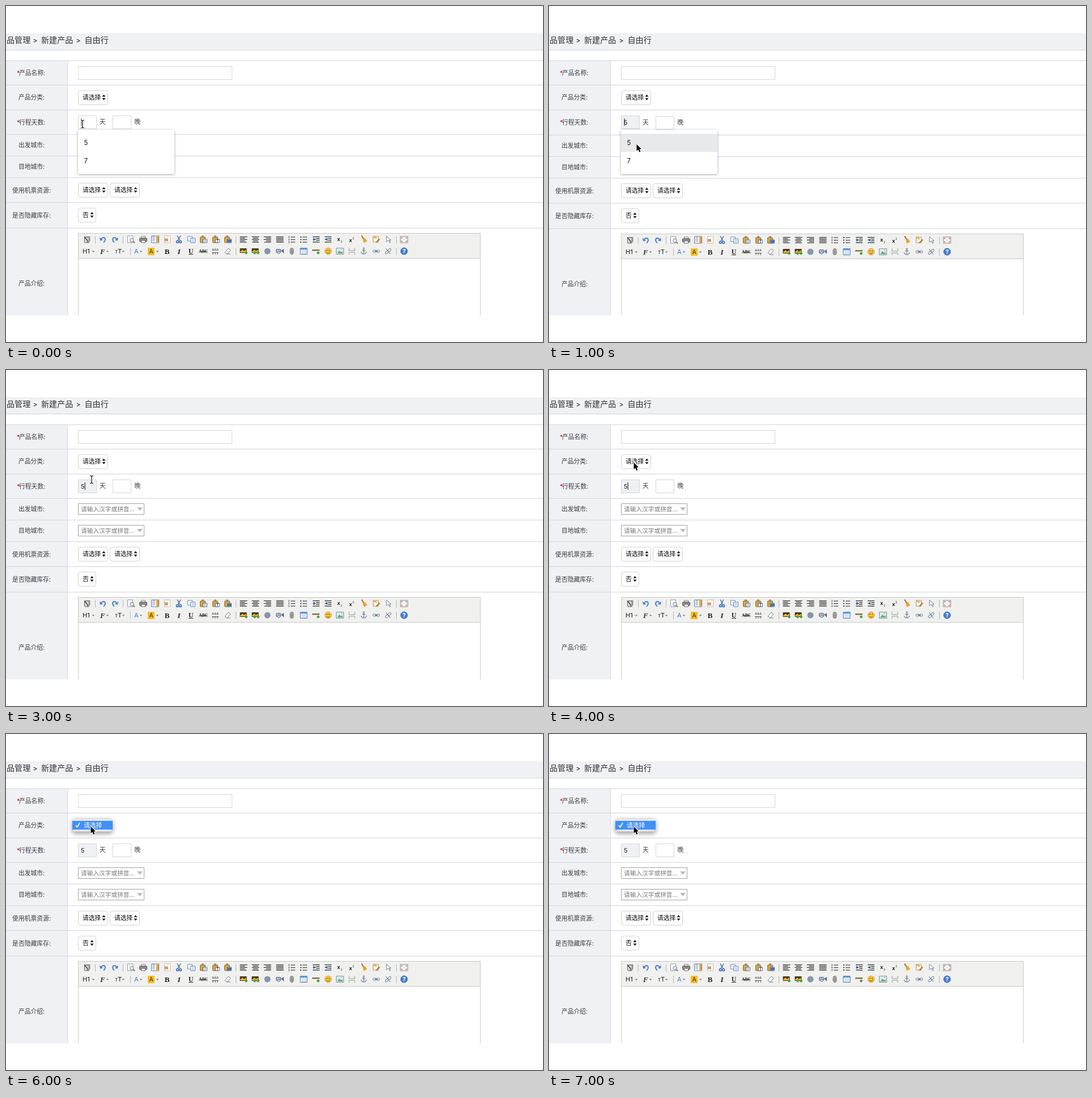
Recreate the animation shown at these times as an HTML page with a canvas. Size 947 px wide and 592 px high, loop 8 s.

```html
<!DOCTYPE html>
<html lang="zh-CN">
<head>
<meta charset="utf-8">
<style>
html, body { margin: 0; width: 100%; height: 100%; overflow: hidden; background: #fff; }
canvas { display: block; }
</style>
</head>
<body>
<canvas id="stage" width="947" height="592"></canvas>
<script>
const c = document.getElementById('stage').getContext('2d');
const CJK = '"Noto Sans CJK SC", "Noto Sans CJK JP", "Noto Sans CJK", sans-serif';
const LATIN = 'Inter, Roboto, sans-serif';
const SERIF = '"Liberation Serif", serif';
const RULE = '#d9dbde', PANEL = '#f0f1f4', INK = '#3c3c44';

function rect(x, y, w, h, fill, stroke, radius = 0) {
  c.beginPath();
  const o = stroke ? .5 : 0;
  c.roundRect(x + o, y + o, w - 2 * o, h - 2 * o, radius);
  if (fill) { c.fillStyle = fill; c.fill(); }
  if (stroke) { c.strokeStyle = stroke; c.lineWidth = 1; c.stroke(); }
}
function path(color, width, ...p) {
  c.beginPath();
  for (let i = 0; i < p.length; i += 2) c.lineTo(p[i], p[i + 1]);
  if (width) { c.strokeStyle = color; c.lineWidth = width; c.stroke(); }
  else { c.fillStyle = color; c.fill(); }
}
function disc(x, y, r, fill, stroke, width = 1) {
  c.beginPath();
  c.arc(x, y, r, 0, 7);
  if (fill) { c.fillStyle = fill; c.fill(); }
  if (stroke) { c.strokeStyle = stroke; c.lineWidth = width; c.stroke(); }
}
function text(s, x, y, size = 10.8, color = INK, font = CJK, style = '', align = 'left') {
  c.font = `${style} ${size}px ${font}`;
  c.textAlign = align;
  c.fillStyle = color;
  c.fillText(s, x, y);
}
function at(x, y, draw) {
  c.save();
  c.translate(x, y);
  draw();
  c.restore();
}
function shadow(color, blur, dy, draw) {
  c.save();
  c.shadowColor = color; c.shadowBlur = blur; c.shadowOffsetY = dy;
  draw();
  c.restore();
}

// Toolbar icons, drawn around their centre
const sheet = (x, y, w, h, edge = '#8e9aa8') => rect(x, y, w, h, '#fff', edge);
const bars = (x, widths, color = '#333') => widths.forEach((w, i) =>
  rect(x === 'mid' ? -w / 2 : x === 'end' ? 6.5 - w : x, -5.5 + i * 2.4, w, 1.2, color));
const mirror = draw => () => { c.scale(-1, 1); draw(); };
const undo = () => {
  c.beginPath();
  c.moveTo(-3, -1);
  c.bezierCurveTo(1, -7, 8, -1, 1, 5);
  c.strokeStyle = '#4a7fce'; c.lineWidth = 2; c.stroke();
  path('#4a7fce', 0, -6, -4, -5, 2, 0, 1);
};
const clipboard = mark => () => {
  rect(-6, -5, 10, 11, '#d9a441', '#8a6a2c', 1);
  rect(-3, -7, 4, 3, '#888');
  sheet(-1, -1, 8, 7, '#5a7394');
  mark();
};
const align = (x, ...widths) => () => bars(x, widths);
const list = numbered => () => {
  for (const y of [-5, -.5, 4]) {
    rect(-2, y, 8, 1.2, '#444');
    numbered ? rect(-5.5, y - 1, 1.2, 3, '#444') : rect(-6, y - .5, 2, 2, '#345');
  }
};
const indent = dir => () => {
  rect(-6, -5.5, 12, 1.3, '#333');
  rect(0, -2.5, 6, 1.3, '#333');
  rect(0, .5, 6, 1.3, '#333');
  rect(-6, 3.8, 12, 1.3, '#333');
  path('#2f68b5', 0, -3 + dir * 3, -.3, -3 - dir * 2, -3, -3 - dir * 2, 2.4);
  rect(-6, -.9, 5, 1.3, '#2f68b5');
};
const photo = count => () => {
  rect(-6.5, -5, 12, 8, '#423421');
  path('#f0b72e', 0, -6, 1, -2, -3, 1, 0, 4, -3, 5, 2, -6, 2);
  for (let i = 0; i < count; i++) {
    rect(2 - i * 6, 2, 5, 2, '#35a02f');
    rect(3.5 - i * 6, .5, 2, 5, '#35a02f');
  }
};
const link = broken => () => {
  c.rotate(broken ? -.7 : 0);
  for (const x of [-3, 3]) rect(x - 3.5, -2.5, 7, 5, null, '#7286a3', 2.5);
  if (!broken) return rect(-3, -.6, 6, 1.3, '#506a91');
  path('#7286a3', 1, 0, -6, 0, 6);
};
const glyph = (s, size, font, style, color = '#222', y = 4.5) => () =>
  text(s, 0, y, size, color, font, style, 'center');
const menu = (x, color = '#777') => path(color, 0, x - 2.3, -.5, x + 2.3, -.5, x, 2);

const topRow = {
  143: () => {
    rect(-5, -5, 9, 11, '#d4d4d4', '#666', 1);
    path('#444', 1.5, -5, -5, 1, 2, 1, 5);
    path('#777', 1, -2, -5, 5, -5, 5, 3);
  },
  171: undo,
  192: mirror(undo),
  220: () => {
    sheet(-6, -7, 10, 13);
    disc(2, 1, 3.3, '#dbeafa', '#6f8195');
    path('#a8783c', 2, 4, 3, 7, 6);
  },
  242: () => {
    rect(-4, -6, 8, 4, '#fff', '#777');
    rect(-7, -3, 14, 7, '#8c8c8c', '#555', 1);
    sheet(-4, 1, 8, 5, '#666');
  },
  263: () => {
    sheet(-7, -7, 14, 13, '#5b7fb0');
    rect(2, -6, 4, 11, '#e9a23b');
    bars(-5, [5, 5, 5, 5], '#8ba3c5');
  },
  284: () => {
    sheet(-5, -7, 11, 13, '#bbb');
    rect(-4, -2, 6, 5, '#d69a55');
  },
  305: () => {
    path('#4c6f9f', 1.5, -3, -7, 2, 2);
    path('#4c6f9f', 1.5, 3, -7, -2, 2);
    for (const x of [-2.7, 2.7]) disc(x, 4, 1.9, null, '#3569b4', 1.5);
  },
  327: () => {
    sheet(-7, -6, 9, 9, '#6789bd');
    sheet(-2, -3, 9, 9, '#6789bd');
    for (const y of [-1, 1, 3]) rect(0, y, 5, 1, '#9bb8df');
  },
  348: clipboard(() => { for (const y of [1, 3]) rect(1, y, 4, 1, '#7e99bd'); }),
  370: clipboard(() => text('T', 3, 5, 7, '#345', LATIN, 'bold', 'center')),
  391: clipboard(() => rect(0, 0, 6, 5, '#3f70b8')),
  419: align(-6.5, 13, 9, 13, 9, 12),
  440: align('mid', 13, 9, 13, 9, 12),
  461: align('end', 13, 9, 13, 9, 12),
  483: align(-6.5, 13, 13, 13, 13, 13),
  504: list(true),
  525: list(false),
  547: indent(1),
  568: indent(-1),
  589: () => { text('x', -5, 2.5, 9, '#222', LATIN, 'bold'); text('2', 1, 5, 5, '#222', LATIN); },
  610: () => { text('x', -5, 4, 9, '#222', LATIN, 'bold'); text('2', 1, -.5, 5, '#222', LATIN); },
  631: () => {
    path('#a36c28', 2, -4, -7, 0, -1);
    path('#e8a331', 0, -2, -1, 2, -3, 6, 3, 0, 6);
  },
  653: () => {
    sheet(-6, -6, 10, 11, '#a38f69');
    path('#e6b443', 3, -5, -5, 1, -2);
    path('#bd8130', 2.5, 6, -1, 0, 5);
  },
  674: () => {
    path('#fff', 0, -3, -6, -3, 4, 4, 1);
    path('#71849c', 1, -3, -6, -3, 4, 0, 1, 3, 6, 4, 5, 2, 1, 5, 1, -3, -6);
  },
  702: () => {
    sheet(-7, -6, 14, 12, '#888');
    for (const x of [-1, 1]) for (const y of [-1, 1])
      path('#c65349', 0, x * 5, y * 4, x * 2, y * 4, x * 5, y);
    rect(-1.5, -1.5, 3, 3, '#ddd');
  }
};
const bottomRow = {
  146: () => { text('H1', -11, 4, 11, '#333', LATIN, '500'); menu(8); },
  174: () => { text('F', -8, 4.5, 13, '#333', SERIF, 'italic bold'); menu(5); },
  200: () => {
    text('T', -8, 4, 8, '#333', LATIN, '500');
    text('T', -3, 4, 11, '#333', LATIN, '500');
    menu(7);
  },
  233: () => { text('A', -7, 4, 11, '#397fd4', LATIN); menu(5); },
  260: () => {
    rect(-10, -6, 12, 13, '#f6bd22');
    text('A', -4, 4, 10.5, '#333', LATIN, '', 'center');
    menu(7);
  },
  284: glyph('B', 13, SERIF, 'bold'),
  305: glyph('I', 13, SERIF, 'bold italic'),
  326: () => { text('U', 0, 3.5, 12, '#222', SERIF, 'bold', 'center'); rect(-4, 5, 8, 1, '#222'); },
  348: () => { text('ABC', 0, 3, 7.5, '#222', SERIF, 'bold', 'center'); rect(-7, 0, 14, 1, '#222'); },
  369: () => {
    for (const y of [-2.5, 2]) rect(-6, y, 12, 1, '#555');
    for (const x of [-4, 0, 4]) { rect(x - .5, -5, 1, 3, '#555'); rect(x - .5, 2, 1, 4, '#555'); }
  },
  391: () => {
    path('#fff', 0, -5, 2, 1, -5, 5, -2, -1, 5);
    path('#777d8e', 1, -5, 2, 1, -5, 5, -2, -1, 5, -5, 2);
    path('#777d8e', 1, -2, 5, 5, 5);
  },
  419: photo(1),
  440: photo(2),
  461: () => disc(0, 0, 5.5, '#8796a8'),
  483: () => {
    rect(-7, -4, 9, 7, '#a8b7cc', '#58708e', 1);
    path('#58708e', 0, 2, -1, 7, -4, 7, 4);
    disc(-2, 2, 2.2, '#ddd', '#58708e');
  },
  504: () => { rect(-3.5, -6, 7, 12, '#aaa', '#777', 3); rect(-1, -3, 2, 7, '#ddd', '#888', 1); },
  525: () => {
    sheet(-6.5, -6, 13, 12, '#4278bb');
    rect(-6, -5.5, 12, 3, '#5f98df');
    for (const x of [-3, 0, 3]) rect(x, -3, .7, 8, '#a7bfdf');
    for (const y of [0, 3]) rect(-6, y, 12, .7, '#a7bfdf');
  },
  547: () => {
    rect(-7, -3, 13, 2.5, '#8b6d45');
    rect(1, 2, 5, 2, '#35a02f');
    rect(2.5, .5, 2, 5, '#35a02f');
  },
  568: () => {
    disc(0, 0, 5.8, '#f9c63d', '#d49d2d');
    for (const x of [-2, 2]) disc(x, -1.5, .9, '#543');
    c.beginPath(); c.arc(0, .5, 3, .3, 2.8); c.strokeStyle = '#754719'; c.stroke();
  },
  589: () => {
    rect(-7, -6, 14, 12, '#d9eafb', '#7894ae');
    path('#6dac54', 0, -5, 4, -1, -1, 2, 2, 4, 0, 5, 4);
    disc(3, -3, 1.2, '#eac04b');
  },
  610: () => {
    path('#999', 1, -5, -6, -5, -1, 5, -1, 5, -6);
    path('#999', 1, -5, 6, -5, 2, 5, 2, 5, 6);
  },
  631: () => {
    disc(0, -5, 1.3, null, '#75859d');
    path('#75859d', 1.4, 0, -4, 0, 5);
    path('#75859d', 1.2, -3, -1.5, 3, -1.5);
    c.beginPath(); c.arc(0, 0, 5, .2, 2.94); c.stroke();
  },
  653: link(false),
  674: link(true),
  702: () => {
    disc(0, 0, 6, '#4a7fd4', '#335fae');
    text('?', 0, 3.7, 10, '#fff', LATIN, 'bold', 'center');
  }
};

function select(x, y, w, label) {
  rect(x, y, w, 26, '#fff', '#cfcfd2', 4);
  text(label, x + 8, y + 16.6, 10.8, '#111', CJK, '500');
  const ax = x + w - 7.5, ay = y + 12.5;
  path('#111', 0, ax - 3, ay - 1.2, ax + 3, ay - 1.2, ax, ay - 5);
  path('#111', 0, ax - 3, ay + 1.2, ax + 3, ay + 1.2, ax, ay + 5);
}
function combo(y) {
  rect(127, y, 117, 20, '#fff', '#a2a2a2');
  text('请输入汉字或拼音...', 132, y + 14, 10.7, '#777');
  path('#bbb', 0, 231, y + 7, 241, y + 7, 236, y + 13);
}
function label(s, y, required) {
  if (!required) return text(s, 45, y + 4, 10.8, INK, CJK, '', 'center');
  text('*', 19, y + 4, 10, '#e02020', LATIN, 'bold');
  text(s, 23, y + 4);
}
function editor(y) {
  rect(127, y, 710, 200, '#fff', '#c9c9c9');
  rect(127, y, 710, 45, '#f0f0ee', '#c9c9c9');
  [[topRow, 11.5, [157, 206, 405, 688]], [bottomRow, 32, [219, 405, 688]]].forEach(([icons, dy, gaps]) => {
    for (const x of gaps) rect(x, y + dy - 6, 1, 13, '#b5b5b5');
    for (const x in icons) at(+x, y + dy, icons[x]);
  });
}
function suggestions(active) {
  shadow('rgba(0,0,0,.35)', 4, 1, () => rect(127, 218, 170, 78, '#fff', null, 2));
  if (active) rect(127, 225, 170, 32, '#e8e9eb');
  text('5', 137.5, 245, 11.5, '#111', LATIN);
  text('7', 137.5, 277, 11.5, '#111', LATIN);
}
function popup() {
  shadow('rgba(0,0,0,.4)', 9, 3, () => rect(117, 149, 71, 23, '#f4f4f4', '#d8d8d8', 4));
  rect(117, 153, 71, 15.5, '#4190f7');
  path('#fff', 1.6, 123, 161, 125.5, 164, 130, 156.5);
  text('请选择', 137, 164.7, 10.8, '#fff', CJK, '500');
}
function arrow(x, y) {
  at(x, y, () => {
    const shape = [0, 0, 0, 12, 2.7, 9.5, 4.8, 14, 7, 13, 5, 8.7, 8.5, 8.5, 0, 0];
    path('#fff', 2, ...shape);
    path('#000', 0, ...shape);
  });
}
function ibeam(x, y) {
  for (const [color, width] of [['#fff', 3], ['#111', 1.2]]) {
    path(color, width, x, y - 6, x, y + 6);
    for (const s of [-1, 1]) path(color, width, x - 3, y + s * 7, x, y + s * 6, x + 3, y + s * 7);
  }
}

function draw(t) {
  const hinted = t < 3000, preview = t >= 1000 && hinted, opened = t >= 5000;
  const d = preview ? 1 : 0;
  c.clearRect(0, 0, 947, 592);
  c.save();
  c.beginPath(); c.rect(0, 0, 947, 545); c.clip();

  rect(0, 48, 947, 30, PANEL);
  rect(0, 77, 947, 1, '#d0d3d6');
  [['品管理', 1], ['新建产品', 62], ['自由行', 138.5]].forEach(([s, x]) => text(s, x, 65.3, 14.1, '#333'));
  for (const x of [47.5, 123.5]) text('>', x, 65, 12, '#333', LATIN, '500');

  rect(0, 97, 108, 448, PANEL);
  for (const y of [96, 139, 183, 226 + d, 264 + d, 302 + d, 346 + d, 391 + d]) rect(0, y - .25, 947, 1.25, RULE);
  rect(108, 97, 1.2, 448, RULE);

  label('产品名称:', 118, true);
  label('产品分类:', 161);
  label('行程天数:', 204.5 + d / 2, true);
  label('出发城市:', 244.5 + d);
  label('目地城市:', 282.5 + d);
  label('使用机票资源:', 324.5 + d);
  label('是否隐藏库存:', 368.5 + d);
  label('产品介绍:', 489 + d);

  rect(127, 106, 272, 24, '#fff', '#d3d5d8');
  if (!opened) select(127, 148.5, 53, '请选择');
  rect(127, 193, 33, 24, t < 1000 ? '#fff' : PANEL, '#d3d5d8');
  rect(188, 193 + d, 33, 24, '#fff', '#d3d5d8');
  text('天', 165, 208 + d);
  text('晚', 226.5, 208 + d);
  if (t >= 1000) text('5', 132, 208.5 + d / 2, 11, '#222', LATIN);
  if (!opened) rect(hinted ? 132.5 : 138.7, 198, 1, 13, '#111');

  if (!hinted) { combo(235); combo(273); }
  select(127, 311.5 + d, 53, '请选择');
  select(183, 311.5 + d, 53, '请选择');
  select(127, 355.5 + d, 32, '否');
  editor(400 + d);

  if (hinted) suggestions(preview);
  if (opened) popup();
  if (t < 1000) ibeam(135, 208);
  else if (preview) arrow(154.5, 243.5);
  else if (t < 4000) ibeam(151, 193);
  else arrow(149.5, 163);
  c.restore();
}

function tick() {
  draw(performance.now() % 8000);
  requestAnimationFrame(tick);
}
tick();
</script>
</body>
</html>
```
